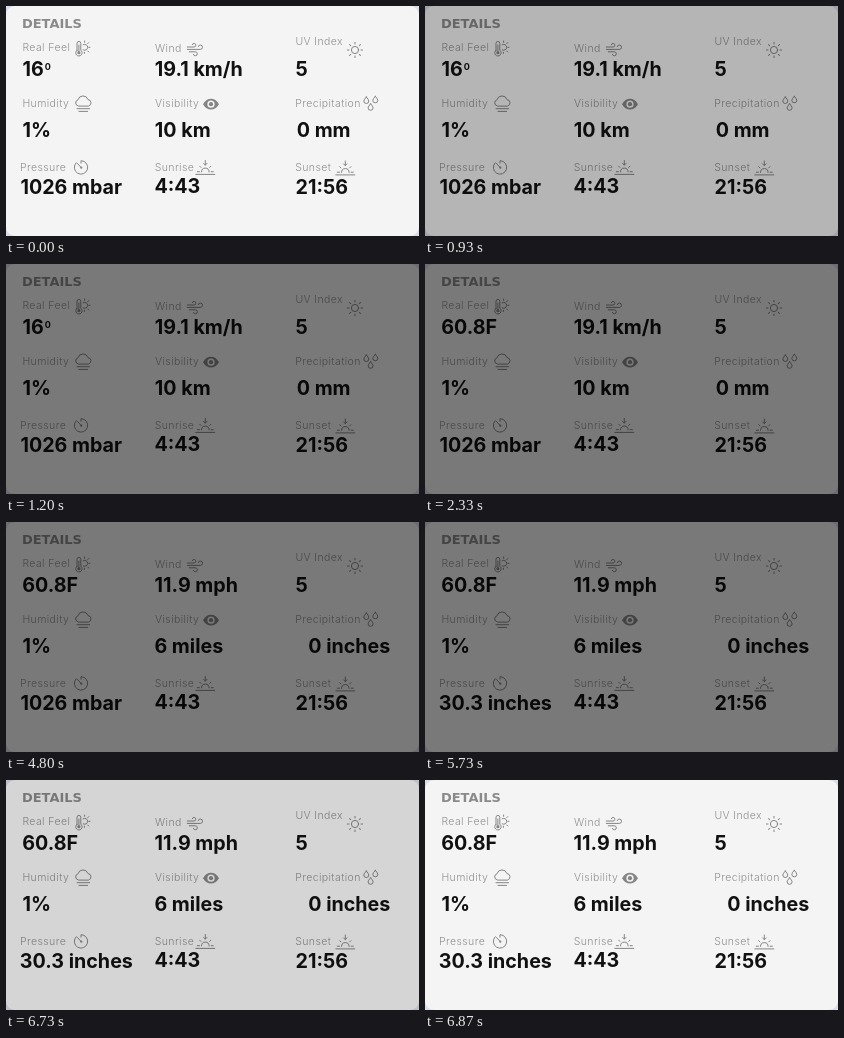
These frames come from a looping animation (413 by 230 pixels, 9140 ms). An HTML page:

```html
<!DOCTYPE html>
<html lang="en">
<head>
<meta charset="utf-8">
<title>Weather details</title>
<style>
  html, body { margin: 0; width: 100%; height: 100%; overflow: hidden; background: #d9dce9; }
  svg { display: block; width: 100vw; height: 100vh; }
  text { font-family: Inter, sans-serif; }
  .title { font: 700 13px "DejaVu Sans", sans-serif; fill: #8a8a8a; }
  .label { font-size: 10.5px; font-weight: 300; letter-spacing: .4px; fill: #909090; }
  .value { font-size: 19.7px; font-weight: 700; fill: #111; }
  .degree { font-size: 9px; font-weight: 700; fill: #111; }
  .icon { fill: none; stroke: #858585; stroke-width: 1; stroke-linecap: round; stroke-linejoin: round; }
  .solid { fill: #858585; stroke: none; }
</style>
</head>
<body>
<svg id="stage" viewBox="0 0 413 230">
  <defs>
    <path id="horizon" class="icon" d="M0 14.4H19M1.5 11.7H3.7M15.3 11.7H17.5M5.7 11.9a3.8 3.8 0 0 1 7.6 0M3.9 6.2L5.1 7.4M15.1 6.2L13.9 7.4M9.5 .5V5M7.8 3.4L9.5 5.1L11.2 3.4"/>
  </defs>
  <rect width="413" height="230" rx="9" fill="#f4f4f4"/>
  <text class="title" x="15.9" y="22">DETAILS</text>

  <g id="thermometer" class="icon">
    <path d="M71 44.2V37.3a1.9 1.9 0 0 1 3.8 0V44.2a3.2 3.2 0 1 1-3.8 0ZM72.9 39V45"/>
    <circle class="solid" cx="72.9" cy="46.7" r="1.6"/>
    <path d="M77.2 38.7a3 3 0 1 1 0 5.2M78.6 35V36.3M81.7 37.6L82.7 36.6M82.8 41.3H84M81.7 45L82.7 46M78.4 46.2V47.4"/>
  </g>
  <path id="wind" class="icon" d="M181.3 41H188a1.8 1.8 0 1 0-1.7-2.3M181.3 43.4H194.3a2.2 2.2 0 1 0-2.1-2.8M183.3 45.8H189.3a2 2 0 1 1-1.9 2.6"/>
  <g id="sun" class="icon"></g>
  <path id="cloud" class="icon" d="M72.2 100a3.2 3.2 0 0 1-.2-6.2 5.2 5.2 0 0 1 10-.2 3.3 3.3 0 0 1 .8 6.4ZM71 102.7H83.6M73 105.4H81.6"/>
  <g id="eye">
    <path class="solid" d="M197 98.2Q200.3 92.8 205 92.8T213 98.2Q209.7 103.6 205 103.6T197 98.2Z"/>
    <circle cx="205" cy="98.2" r="3.6" fill="#f4f4f4"/>
    <circle class="solid" cx="205" cy="98.2" r="2.1"/>
  </g>
  <g id="drops" class="icon"></g>
  <g id="gauge" class="icon">
    <path d="M75 157.2V154.7A6.7 6.7 0 1 1 70.2 156.7M71.5 157.5L75.2 161.6"/>
    <circle class="solid" cx="75.3" cy="161.7" r="1.1"/>
  </g>
  <use href="#horizon" x="189.8" y="154"/>
  <use href="#horizon" x="329.8" y="154.5"/>

  <g id="labels"></g>
  <g id="values"></g>
  <text id="degree" class="degree" x="38.8" y="64.3">0</text>
  <rect id="shade" width="413" height="230"/>
</svg>
<script>
const LOOP = 9140;
const byId = id => document.getElementById(id);

function add(parent, tag, attrs, content = "") {
  const node = document.createElementNS("http://www.w3.org/2000/svg", tag);
  for (const key in attrs) node.setAttribute(key, attrs[key]);
  node.textContent = content;
  return byId(parent).appendChild(node);
}

const labels = [
  ["Real Feel", 16.4, 45], ["Wind", 149, 46], ["UV Index", 289.4, 39],
  ["Humidity", 16.4, 101], ["Visibility", 149, 101], ["Precipitation", 289.2, 101],
  ["Pressure", 14, 165], ["Sunrise", 148.7, 165], ["Sunset", 289.2, 165]
];
for (const [text, x, y] of labels) add("labels", "text", { class: "label", x, y }, text);

// Each value lists its states as [start time, text, x].
const values = [
  { y: 69.8, states: [[0, "16", 16.4], [2330, "60.8F", 16.2]] },
  { y: 70.3, states: [[0, "19.1 km/h", 148.8], [3400, "11.9 mph", 148.6]] },
  { y: 69.8, states: [[0, "5", 289.6]] },
  { y: 131.3, states: [[0, "1%", 16.4]] },
  { y: 131.3, states: [[0, "10 km", 148.8], [4800, "6 miles", 148.4]] },
  { y: 131.3, states: [[0, "0 mm", 290.7], [4130, "0 inches", 290.4], [4800, "0 inches", 302.2]] },
  { y: 187.5, states: [[0, "1026 mbar", 14.4], [5730, "30.3 inches", 13.8]] },
  { y: 187.3, states: [[0, "4:43", 148.4]] },
  { y: 188.2, states: [[0, "21:56", 289.6]] }
];
for (const value of values) value.node = add("values", "text", { class: "value", y: value.y });

const shades = [[0, 0], [930, .26], [1200, .5], [6730, .13], [6870, 0]];

add("sun", "circle", { cx: 349, cy: 44, r: 3.6 });
for (let i = 0; i < 8; i++) {
  add("sun", "path", { d: "M349 38V36.4", transform: `rotate(${i * 45} 349 44)` });
}
for (const [x, y] of [[360.3, 91], [369.3, 90.3], [364.6, 97.8]]) {
  add("drops", "path", { d: `M${x} ${y}q-2.5 2.7-2.5 4a2.5 2.5 0 0 0 5 0q0-1.3-2.5-4Z` });
}

const current = (states, time) => states.filter(([start]) => start <= time).pop();

function render(time) {
  for (const { node, states } of values) {
    const [, text, x] = current(states, time);
    if (node.textContent !== text) node.textContent = text;
    node.setAttribute("x", x);
  }
  byId("degree").setAttribute("visibility", time < 2330 ? "visible" : "hidden");
  byId("shade").setAttribute("opacity", current(shades, time)[1]);
}

const origin = performance.now();
function tick() {
  render((performance.now() - origin) % LOOP);
  requestAnimationFrame(tick);
}
tick();
</script>
</body>
</html>
```
